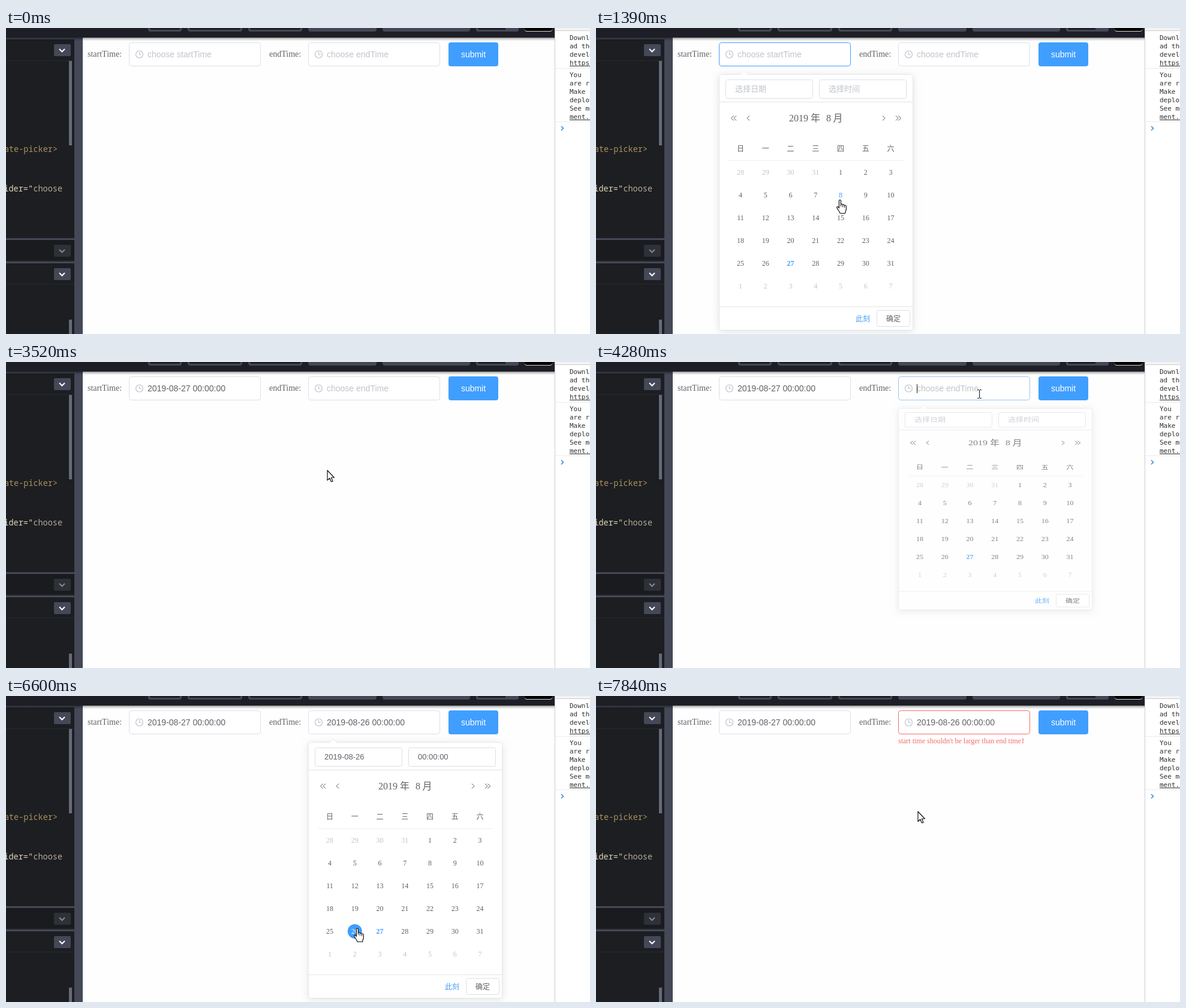
An HTML page with a canvas for the animation above (8 s loop, 974 by 511 pixels).

```html
<!DOCTYPE html>
<html lang="zh-CN">
<head>
<meta charset="utf-8">
<title>Date range form</title>
<style>
html, body { margin: 0; width: 100%; height: 100%; overflow: hidden; background: #fff; }
canvas { display: block; width: 974px; height: 511px; }
</style>
</head>
<body>
<canvas id="stage" width="974" height="511"></canvas>
<script>
const ctx = document.getElementById('stage').getContext('2d');
const LOOP = 8000;
const SERIF = '"Liberation Serif", serif';
const SANS = '"Liberation Sans", sans-serif';
const MONO = '"Noto Sans Mono", monospace';
const CJK = '"Noto Sans CJK SC", sans-serif';
const BLUE = '#409eff', TEXT = '#606266', PALE = '#c0c4cc', BORDER = '#dcdfe6', RED = '#f56c6c';
const CHROME = '#444857';

// Timing of each picker: focus and open, date picked, closed
const fields = [
  { x: 205, hint: 'choose startTime', open: 703, pick: 2420, close: 3090, day: 27 },
  { x: 504, hint: 'choose endTime', open: 4200, pick: 6400, close: 7410, day: 26 },
];
const ERROR_AT = 7430;

// Pointer stops: time, x, y of the hot spot
const stops = [
  [70, 619, 125], [380, 390, 66], [620, 331, 55], [900, 331, 55], [1470, 411, 300],
  [1560, 412, 306], [2010, 317, 398], [2480, 317, 398], [2890, 500, 480], [3090, 500, 480],
  [3520, 536, 181], [3640, 536, 181], [4080, 639, 53], [4440, 639, 53], [4510, 639, 58],
  [4690, 639, 58], [4930, 700, 270], [5130, 684.5, 358], [5500, 691, 389], [5590, 691, 393],
  [5690, 691, 393], [6200, 586, 388], [6690, 586, 388], [7290, 799, 478], [7410, 799, 478],
  [7840, 537, 193],
];

const clamp = v => Math.max(0, Math.min(1, v));
const smooth = v => v * v * (3 - 2 * v);
const easeOut = v => 1 - Math.pow(1 - clamp(v), 5);
const within = (p, x, y, w, h) => p.x >= x && p.x < x + w && p.y >= y && p.y < y + h;

function mix(a, b, k) {
  const part = (c, i) => parseInt(c.substr(1 + 2 * i, 2), 16);
  return `rgb(${[0, 1, 2].map(i => Math.round(part(a, i) + (part(b, i) - part(a, i)) * k))})`;
}

function rect(x, y, w, h, color) {
  ctx.fillStyle = color;
  ctx.fillRect(x, y, w, h);
}

function box(x, y, w, h, r, fill, stroke) {
  const o = stroke ? 0.5 : 0;
  ctx.beginPath();
  ctx.roundRect(x + o, y + o, w - 2 * o, h - 2 * o, r);
  if (fill) { ctx.fillStyle = fill; ctx.fill(); }
  if (stroke) { ctx.strokeStyle = stroke; ctx.lineWidth = 1; ctx.stroke(); }
}

function label(str, x, y, size, family, color, align = 'left', weight = '') {
  ctx.font = `${weight} ${size}px ${family}`;
  ctx.textAlign = align;
  ctx.fillStyle = color;
  ctx.fillText(str, x, y);
}

function line(points, color, width = 1) {
  ctx.beginPath();
  points.forEach(([x, y]) => ctx.lineTo(x, y));
  ctx.strokeStyle = color;
  ctx.lineWidth = width;
  ctx.stroke();
}

function drawTopBar() {
  rect(0, 0, 915, 16, '#1e1f26');
  [[237, 56], [303, 91], [404, 90], [784, 71]].forEach(([x, w]) => {
    box(x, -20, w, 26, 4, CHROME);
    box(x + 3, -20, w - 6, 23, 2, '#1e1f26');
  });
  box(504, -20, 114, 26, 4, CHROME);
  box(628, -20, 146, 26, 4, CHROME);
  box(833, -20, 22, 26, 4, CHROME);
  box(865, -20, 46, 26, 4, '#d8d8da');
  box(865, -20, 46, 25, 4, '#000');
}

function drawBarShadow() {
  const shadow = ctx.createLinearGradient(0, 16, 0, 22);
  shadow.addColorStop(0, 'rgba(0,0,0,.42)');
  shadow.addColorStop(0.5, 'rgba(0,0,0,.13)');
  shadow.addColorStop(1, 'rgba(0,0,0,0)');
  rect(0, 16, 915, 6, shadow);
}

function drawToggle(y, fill, stroke) {
  box(80, y, 28, 20, 2, fill);
  line([[89, y + 8], [93.5, y + 12.5], [98, y + 8]], stroke, 2);
}

function drawEditor() {
  rect(0, 16, 114, 495, '#1d1e22');
  rect(0, 16, 114, 3, CHROME);
  rect(0, 54, 114, 1, '#292a30');
  rect(0, 351, 114, 3, CHROME);
  rect(0, 354, 114, 34, '#1a1b1f');
  rect(0, 388, 114, 2, '#25262c');
  rect(0, 390, 114, 3, CHROME);
  rect(0, 427, 114, 1, '#292a30');
  rect(114, 16, 14, 495, CHROME);
  drawToggle(27, CHROME, '#fff');
  drawToggle(362, '#2f3139', '#85878e');
  drawToggle(401, CHROME, '#fff');
  rect(105, 55, 5, 141, '#666b7a');
  rect(105, 487, 5, 24, '#666b7a');
  label('ate-picker>', 86, 207, 13.5, MONO, '#a7925a', 'right');
  label('choose', 94, 273, 13.5, MONO, '#b3ac94', 'right');
  label('ider="', 45, 273, 13.5, MONO, '#ddd5b4', 'right');
}

function drawConsole() {
  rect(915, 0, 59, 511, '#fff');
  rect(915, 0, 59, 4, '#f3f3f3');
  rect(915, 4, 59, 1, '#ccc');
  rect(915, 0, 1, 511, '#ccc');
  rect(916, 67, 58, 1, '#ececec');
  rect(916, 156, 58, 1, '#ececec');
  const block = (lines, y) => lines.forEach((str, i) => {
    label(str, 940, y + 14 * i, 11, '"DejaVu Sans Mono", monospace', '#303030');
    if (i === lines.length - 1) rect(940, y + 14 * i + 1, 34, 1, '#303030');
  });
  block(['Downlo', 'ad the', 'develo', 'https:'], 20);
  block(['You', 'are ru', 'Make s', 'deploy', 'See mo', 'ment.h'], 82);
  line([[926, 164], [929.5, 167.5], [926, 171]], '#3b8ee0', 1.6);
}

function drawField(f, t) {
  const focus = clamp((t - f.open) / 200) * (1 - clamp((t - f.pick) / 200));
  let edge = mix(BORDER, BLUE, focus);
  if (f === fields[1] && t > ERROR_AT) edge = mix(BORDER, RED, clamp((t - ERROR_AT) / 200));
  box(f.x, 24, 220, 40, 4, '#fff', edge);

  const cx = f.x + 17.5;
  ctx.beginPath();
  ctx.arc(cx, 44, 6, 0, Math.PI * 2);
  ctx.strokeStyle = PALE;
  ctx.lineWidth = 1.2;
  ctx.stroke();
  line([[cx, 40], [cx, 44.5], [cx + 3.5, 44.5]], PALE, 1.2);

  const picked = t >= f.pick;
  label(picked ? `2019-08-${f.day} 00:00:00` : f.hint, f.x + 31, 49, 14, SANS, picked ? TEXT : PALE);
  const blinkOn = Math.floor((t - f.open) / 500) % 2 === 0;
  if (t >= f.open && !picked && blinkOn) rect(f.x + 31, 37, 1, 15, '#222');
}

function drawChevron(x, dir) {
  line([[x + 2.2 * dir, 146.5], [x - 2.2 * dir, 150.5], [x + 2.2 * dir, 154.5]], TEXT, 1);
}

// Cells are numbered from the top left, the 1st of August is cell 4
const cellCenter = i => ({ x: 241 + 41.75 * (i % 7), y: 240.5 + 38 * Math.floor(i / 7) });

function drawDay(i, f, picked, pointer) {
  const c = cellCenter(i);
  const inMonth = i >= 4 && i < 35;
  const day = i < 4 ? 28 + i : inMonth ? i - 3 : i - 34;
  const hover = within(pointer, c.x - 20.9, c.y - 19, 41.75, 38);
  const today = inMonth && day === 27;
  const selected = inMonth && picked && day === f.day;
  if (selected) {
    ctx.beginPath();
    ctx.arc(c.x, c.y + 0.5, 12, 0, Math.PI * 2);
    ctx.fillStyle = BLUE;
    ctx.fill();
  }
  const color = !inMonth ? PALE : selected ? '#fff' : today || hover ? BLUE : TEXT;
  label(day, c.x, c.y + 4, 12, SERIF, color, 'center', today ? 'bold' : '');
}

function drawPicker(f, t, mouse) {
  const shown = easeOut((t - f.open) / 300) - easeOut((t - f.close) / 300);
  if (shown <= 0.002) return;
  const picked = t >= f.pick;
  const dx = f.x - 205;
  const pointer = { x: mouse.x - dx, y: mouse.y };

  ctx.save();
  ctx.globalAlpha = shown;
  ctx.translate(dx, 77);
  ctx.scale(1, shown);
  ctx.translate(0, -77);

  ctx.save();
  ctx.shadowColor = 'rgba(0,0,0,.1)';
  ctx.shadowBlur = 12;
  ctx.shadowOffsetY = 2;
  box(205, 77, 324, 428, 4, '#fff');
  ctx.restore();
  box(205, 77, 324, 428, 4, '#fff', '#e4e7ed');
  ctx.beginPath();
  ctx.moveTo(240.5, 78.5);
  ctx.lineTo(247, 72);
  ctx.lineTo(253.5, 78.5);
  ctx.fillStyle = '#fff';
  ctx.fill();
  line([[241, 77.5], [247, 72], [253, 77.5]], '#ebeef5');

  const parts = picked ? [`2019-08-${f.day}`, '00:00:00'] : ['选择日期', '选择时间'];
  parts.forEach((str, i) => {
    box(216 + 156 * i, 86, 146, 32, 3, '#fff', BORDER);
    label(str, 232 + 156 * i, 106, 13, picked ? SANS : CJK, picked ? TEXT : PALE);
  });
  rect(206, 123, 322, 1, '#e4e4e4');

  [227.5, 232, 254].forEach(x => drawChevron(x, 1));
  [480, 502, 506.5].forEach(x => drawChevron(x, -1));
  label('2019', 322, 156, 16, SERIF, TEXT);
  label('年', 358, 156, 16, CJK, TEXT);
  label('8', 384, 156, 16, SERIF, TEXT);
  label('月', 395.5, 156, 16, CJK, TEXT);

  [...'日一二三四五六'].forEach((str, i) => label(str, cellCenter(i).x, 206, 12, CJK, TEXT, 'center'));
  rect(221, 221, 292, 1, '#ebeef5');
  for (let i = 0; i < 42; i++) drawDay(i, f, picked, pointer);

  rect(206, 465, 322, 1, '#e4e4e4');
  label('此刻', 433, 490, 12, CJK, BLUE);
  const hot = within(pointer, 468, 471, 56, 28);
  box(468, 471, 56, 28, 3, '#fff', hot ? BLUE : BORDER);
  label('确定', 484, 490, 12, CJK, hot ? BLUE : TEXT);
  ctx.restore();
}

function drawError(t) {
  const shown = easeOut((t - ERROR_AT) / 300);
  if (!shown) return;
  ctx.save();
  ctx.globalAlpha = shown;
  ctx.translate(504, 66);
  ctx.scale(1, shown);
  const message = "start time shouldn't be larger than end time";
  label(message, 0, 13, 12, SERIF, RED);
  label('!', ctx.measureText(message).width + 1, 13, 12, SERIF, RED, 'left', 'bold');
  ctx.restore();
}

function pointerAt(t) {
  const last = stops[stops.length - 1];
  const i = stops.findIndex(s => s[0] > t);
  if (i === 0) return { x: -99, y: -99 };
  if (i < 0) return { x: last[1], y: last[2] };
  const [t0, x0, y0] = stops[i - 1], [t1, x1, y1] = stops[i];
  const k = smooth((t - t0) / (t1 - t0));
  return { x: x0 + (x1 - x0) * k, y: y0 + (y1 - y0) * k };
}

function pointerKind(p, t) {
  for (const f of fields) {
    if (within(p, f.x, 24, 220, 40)) return 'beam';
    if (t < f.open + 60 || t >= f.close) continue;
    const q = { x: p.x - f.x + 205, y: p.y };
    if (within(q, 216, 86, 146, 32) || within(q, 372, 86, 146, 32)) return 'beam';
    if (within(q, 220, 222, 293, 228) || within(q, 430, 471, 94, 28)) return 'hand';
  }
  return 'arrow';
}

const arrowShape = new Path2D('M0 0V16.5L3.8 13L6.4 19L9 17.9L6.4 12H11.4Z');
const handShape = new Path2D('M-1.6 1.4C-1.6-.4 1.4-.4 1.4 1.4V7C3 6.5 4.2 7 4.3 8.2' +
  'C6 7.4 7.2 8.2 7.3 9.2C9 8.6 10.3 9.4 10.3 11V15.5C10.3 18 8.6 19 8.4 22.5H0C-.4 19.5-3 17.5-5 13.8' +
  'C-6.2 11.6-4 10.6-2.8 12.2L-1.6 13.6Z');

function drawPointer(p, t) {
  const kind = pointerKind(p, t);
  ctx.save();
  ctx.translate(Math.round(p.x), Math.round(p.y));
  if (kind === 'beam') {
    rect(0, -6, 1, 13, '#111');
    [-7, 7].forEach(y => [-3, 1].forEach(x => rect(x, y, 3, 1, '#111')));
  } else {
    const shape = kind === 'hand' ? handShape : arrowShape;
    ctx.fillStyle = '#fff';
    ctx.strokeStyle = '#111';
    ctx.lineWidth = 1.2;
    ctx.lineJoin = 'round';
    ctx.fill(shape);
    ctx.stroke(shape);
    if (kind === 'hand') [[1.4, 7], [4.3, 8.2], [7.3, 9.2]].forEach(([x, y]) => line([[x, y], [x, y + 4]], '#111'));
  }
  ctx.restore();
}

function draw(now) {
  const t = now % LOOP;
  const mouse = pointerAt(t);
  rect(0, 0, 974, 511, '#fefefe');
  drawTopBar();
  drawEditor();
  drawBarShadow();
  drawConsole();

  label('startTime:', 136, 48, 14, SERIF, TEXT);
  label('endTime:', 439, 48, 14, SERIF, TEXT);
  fields.forEach(f => drawField(f, t));
  box(738, 24, 83, 40, 4, BLUE);
  label('submit', 779.5, 49, 14, SANS, '#fff', 'center');
  drawError(t);
  fields.forEach(f => drawPicker(f, t, mouse));
  drawPointer(mouse, t);
}

let began;
function tick(now) {
  began ??= now;
  draw(now - began);
  requestAnimationFrame(tick);
}
draw(0);
requestAnimationFrame(tick);
</script>
</body>
</html>
```
